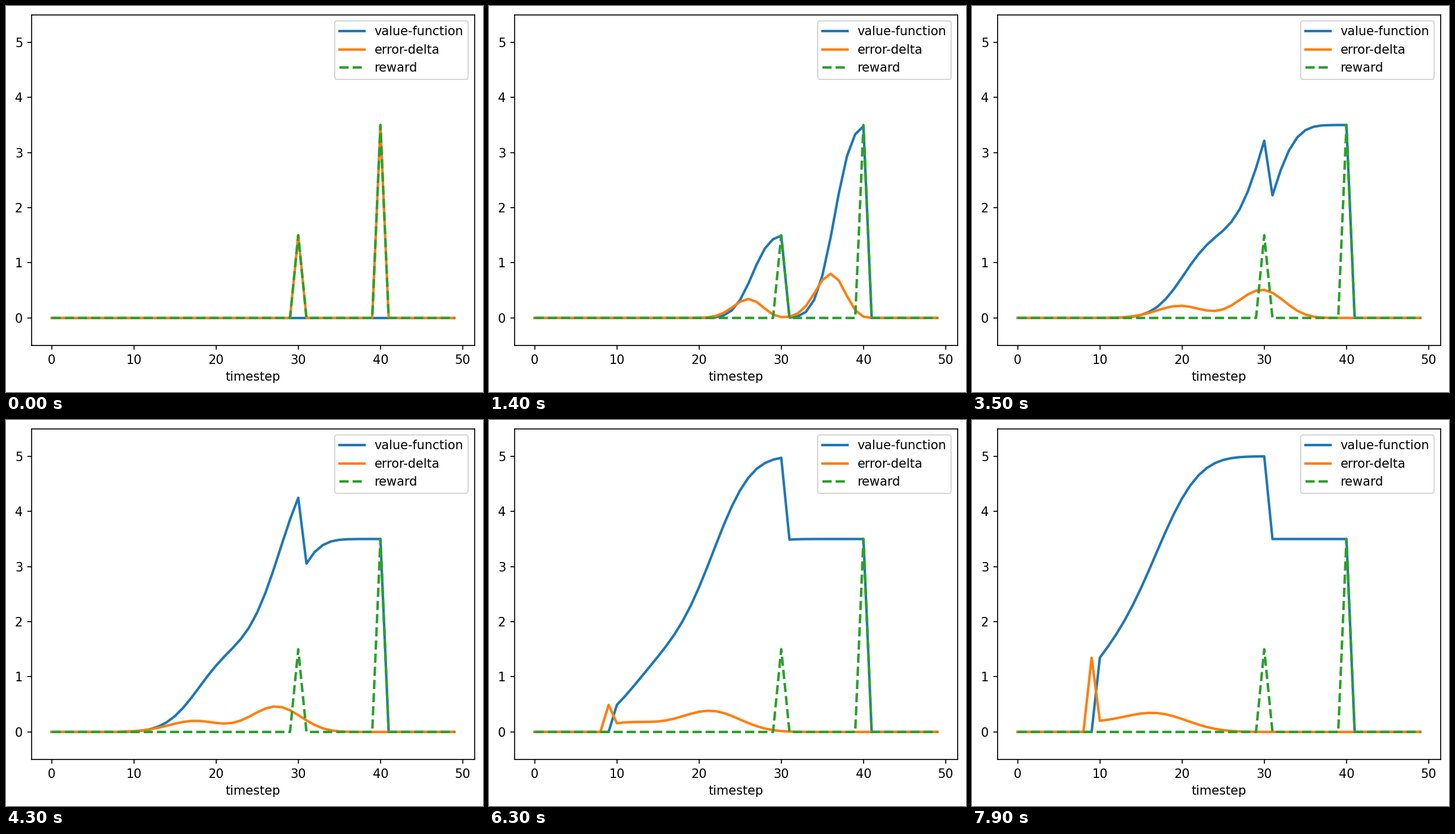
These frames come from a looping animation (801 px wide and 647 px high, 8000 ms). A matplotlib script:

```python
import numpy as np
import matplotlib.pyplot as plt
from matplotlib.animation import FuncAnimation

W, H, DPI = 801, 647, 150
STEPS, TRIALS = 50, 80
CUE = 10        # states before the cue keep a value of zero
ALPHA = 0.3     # learning rate
PAD = 0.1       # inches around the drawing

reward = np.zeros(STEPS)
reward[30], reward[40] = 1.5, 3.5


def td_learning():
    """Value and prediction error of every state, trial by trial."""
    value = np.zeros(STEPS + 1)
    history = []
    for _ in range(TRIALS):
        delta = reward + value[1:] - value[:-1]
        history.append((value[:-1].copy(), delta))
        value[CUE:-1] += ALPHA * delta[CUE:]
    return history


history = td_learning()
t = np.arange(STEPS)

fig = plt.figure(figsize=((W + 0.01) / DPI, (H + 0.01) / DPI), dpi=DPI)
ax = fig.add_axes([0, 0, 1, 1])
value_line, = ax.plot(t, history[0][0], lw=2, label="value-function")
delta_line, = ax.plot(t, history[0][1], lw=2, label="error-delta")
ax.plot(t, reward, "--", lw=2, label="reward")
ax.set_xlim(-2.45, 51.45)
ax.set_ylim(-0.5, 5.5)
ax.set_xlabel("timestep")
ax.legend(loc="upper right")


def place(left, bottom):
    """Put the axes at a pixel offset from the lower left corner."""
    ax.set_position([left / W, bottom / H, 744 / W, 554.4 / H])


# Shift the axes so that the labels end exactly at the padding.
place(43, 78)
box = fig.get_tightbbox()
place(43 + (PAD - box.x0) * DPI, 78 + (PAD - box.y0) * DPI)


def update(trial):
    value, delta = history[trial]
    value_line.set_ydata(value)
    delta_line.set_ydata(delta)
    return value_line, delta_line


anim = FuncAnimation(fig, update, frames=TRIALS, interval=100, repeat=True)
plt.show()
```
